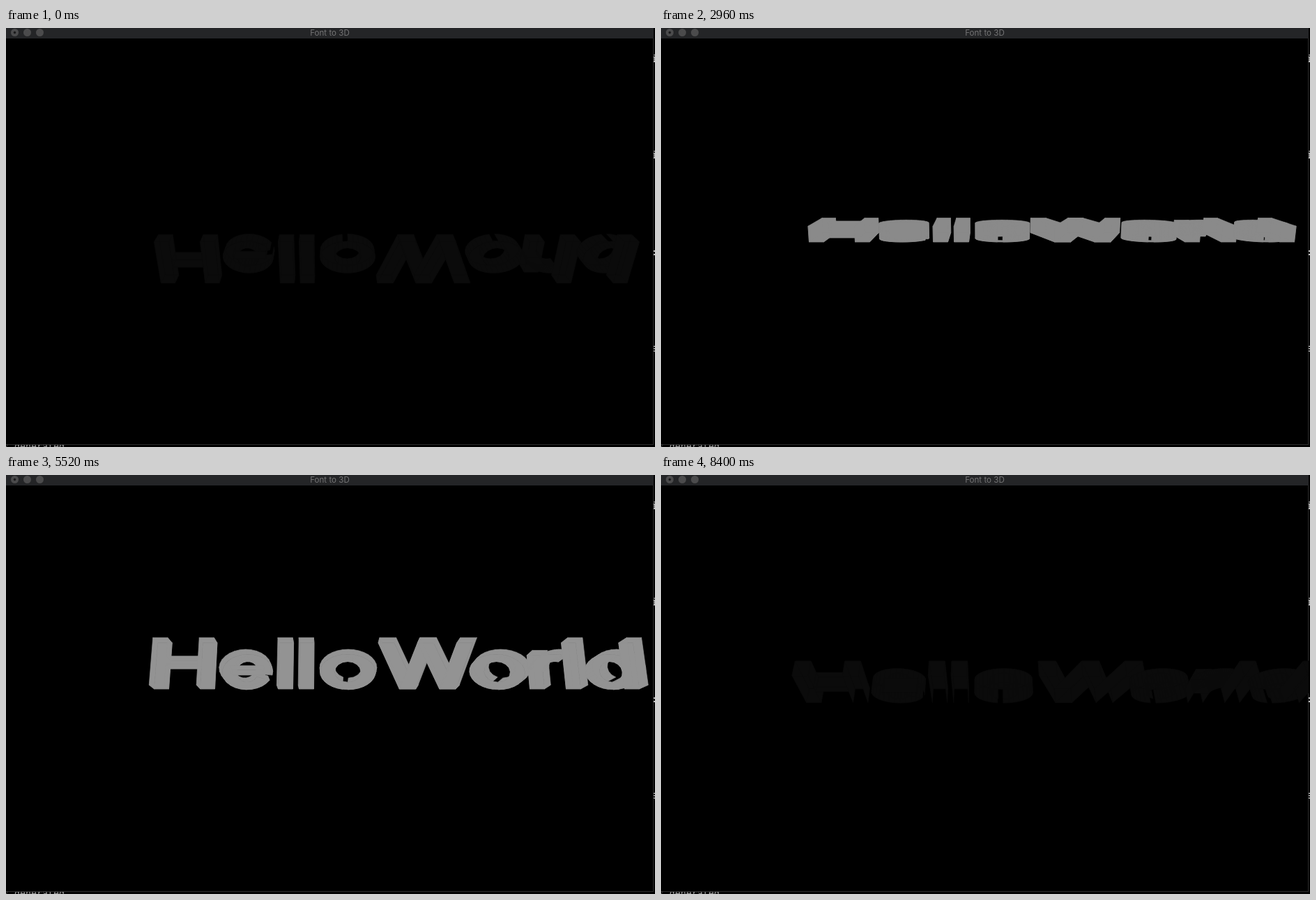
Animation, 931 px wide and 601 px high, one loop 8.44 s. Source, as an HTML page with a canvas:

```html
<!DOCTYPE html>
<html lang="en">
<head>
<meta charset="utf-8">
<title>Font to 3D</title>
<style>
  html, body { margin: 0; width: 100%; height: 100%; overflow: hidden; background: #000; }
  #stage { position: relative; width: 931px; height: 601px; overflow: hidden; background: #000; }
  #stage > * { position: absolute; box-sizing: border-box; }
  .term { font: 13.3px/16px "DejaVu Sans Mono", monospace; color: #a0a0a0; white-space: pre; }
  .side { left: 926px; top: 37px; line-height: 138.3px; margin-top: -61px; color: #e8e8e8; }
  .win { left: 0; top: 0; width: 929px; height: 598px; background: #000; border: solid #2b2b2b; border-width: 0 1px 1px 0; }
  .bar { left: 0; top: 0; width: 929px; height: 15px; background: #242527; }
  .title { left: 0; top: 0; width: 929px; font: 11.6px/14px Inter, sans-serif; color: #747475; text-align: center; }
  .dot { top: 1px; width: 11px; height: 11px; border-radius: 50%; background: #4b4b4c; }
  .dot.edited { background: radial-gradient(circle, #1d1d1e 1.4px, #4b4b4c 2.2px); }
  canvas { left: 0; top: 0; }
</style>
</head>
<body>
<div id="stage">
  <div class="term side">i<br>i<br>:<br>s</div>
  <div class="term" style="left:-4px;top:593px">s generated.</div>
  <div class="win"></div>
  <div class="bar"></div>
  <div class="title">Font to 3D</div>
  <div class="dot edited" style="left:7px"></div>
  <div class="dot" style="left:25px"></div>
  <div class="dot" style="left:43px"></div>
  <canvas id="view" width="931" height="601"></canvas>
</div>
<script>
const LOOP = 8440, STEP = 40, HOLD = 800;
const UPRIGHT = 6080, BRIGHTEST = 4350;   // times in ms
const CX = 465, CY = 306.8, FOCAL = 800, DEPTH = 23, LEFT = 212.5;
const CAP = 69.5, STEM = 21, BAR = 11;    // letter height, vertical and horizontal strokes
const MID = 25.5, BOWL = 26.5;            // centre and half height of round letters
const rad = deg => deg * Math.PI / 180;

// A solid extrudes its loops. The closing edge of each loop has a wall
// always, never, or only when seen from outside.
const solid = (wall, ...loops) => ({ wall, loops });

const arc = (cx, rx, ry, from, to, n) => Array.from({ length: n }, (_, i) => {
  const a = rad(from + (to - from) * i / (n - 1));
  return [cx + rx * Math.cos(a), MID + ry * Math.sin(a)];
});

const slant = (top, bottom, width, y0, y1, wall) => solid(wall,
  [[bottom, y0], [top, y0 + y1 - y0], [top + width, y1], [bottom + width, y0]]);
const box = (x, width, y0, y1, wall = "always") => slant(x, x, width, y0, y1, wall);
const stem = (x, wall = "outside") => box(x, STEM, 0, CAP, wall);

const ring = width => {
  const r = width / 2;
  const oval = (rx, ry, n) => arc(r, rx, ry, -90, 270 - 360 / n, n);
  return solid("never", oval(r, BOWL, 32), oval(r - STEM, BOWL - BAR, 16));
};

const hook = (width, from, to, wall) => {
  const r = width / 2;
  return solid(wall, [...arc(r, r, BOWL, from, to, 28),
    ...arc(r, r - STEM, BOWL - BAR, to, from, 20)]);
};

const zigzag = (width, stroke) => {
  const pitch = (width - stroke) / 4;
  return [0, 1, 2, 3].map(i => {
    const ends = [i * pitch, (i + 1) * pitch];
    if (i % 2) ends.reverse();
    return slant(...ends, stroke, 0, CAP, i < 2 ? "always" : "outside");
  });
};

const GLYPHS = {
  H: { advance: 96.5, solids: [stem(0, "always"), box(STEM, 45, 30, 42), stem(66)] },
  e: { advance: 81.5, solids: [hook(73, -11, 332, "never"), box(15, 47, 20.5, 28, "never")] },
  l: { advance: 30, solids: [stem(0)] },
  o: { advance: 85, solids: [ring(80)] },
  W: { advance: 131, solids: zigzag(138.5, 23.5) },
  r: { advance: 52, solids: [box(0, STEM, 0, 50.5, "outside"), hook(80, 75, 180, "always")] },
  d: { advance: 85, solids: [ring(75), stem(75 - STEM)] }
};

const ctx = document.getElementById("view").getContext("2d");
ctx.beginPath();
ctx.rect(0, 15, 929, 582);
ctx.clip();
ctx.lineWidth = 0.7;
ctx.lineJoin = "round";

function trace(pts) {
  pts.forEach(([x, y], i) => i ? ctx.lineTo(x, y) : ctx.moveTo(x, y));
  ctx.closePath();
}

function paint(faces, rule) {
  ctx.beginPath();
  faces.forEach(trace);
  ctx.fill(rule);
  ctx.stroke();
}

// Same winding for all walls, so that overlaps do not cancel out
function wind(pts) {
  const area = pts.reduce((sum, [x, y], i) => {
    const [nx, ny] = pts[(i + 1) % pts.length];
    return sum + x * ny - nx * y;
  }, 0);
  return area < 0 ? pts.reverse() : pts;
}

function draw(time) {
  const t = time < HOLD ? 0 : Math.floor(time / STEP) * STEP;
  const angle = rad((t - UPRIGHT) / STEP);   // one degree per step
  const sin = Math.sin(angle), cos = Math.cos(angle);
  const shade = Math.round(Math.max(11, 168 * Math.cos(rad((t - BRIGHTEST) / STEP))));

  const project = (x, y, z) => {
    const s = FOCAL / (FOCAL - y * sin - z * cos);
    return [CX + (x - CX) * s, CY - (y * cos - z * sin) * s];
  };

  ctx.clearRect(0, 0, 931, 601);
  ctx.fillStyle = ctx.strokeStyle = `rgb(${shade},${shade},${shade})`;

  let pen = LEFT;
  for (const ch of "HelloWorld") {
    const { advance, solids } = GLYPHS[ch];
    for (const { wall, loops } of solids) {
      const at = z => loops.map(l => l.map(([x, y]) => project(pen + x, y, z)));
      const back = at(0), front = at(DEPTH);
      const closed = wall === "always" || (wall === "outside" && angle < 0);
      const walls = back.flatMap((b, k) => {
        const f = front[k], count = closed ? b.length : b.length - 1;
        return b.slice(0, count).map((p, i) => {
          const j = (i + 1) % b.length;
          return wind([p, b[j], f[j], f[i]]);
        });
      });
      paint(back, "evenodd");
      paint(walls, "nonzero");
    }
    pen += advance;
  }
}

function tick() {
  draw(performance.now() % LOOP);
  requestAnimationFrame(tick);
}
tick();
</script>
</body>
</html>
```
